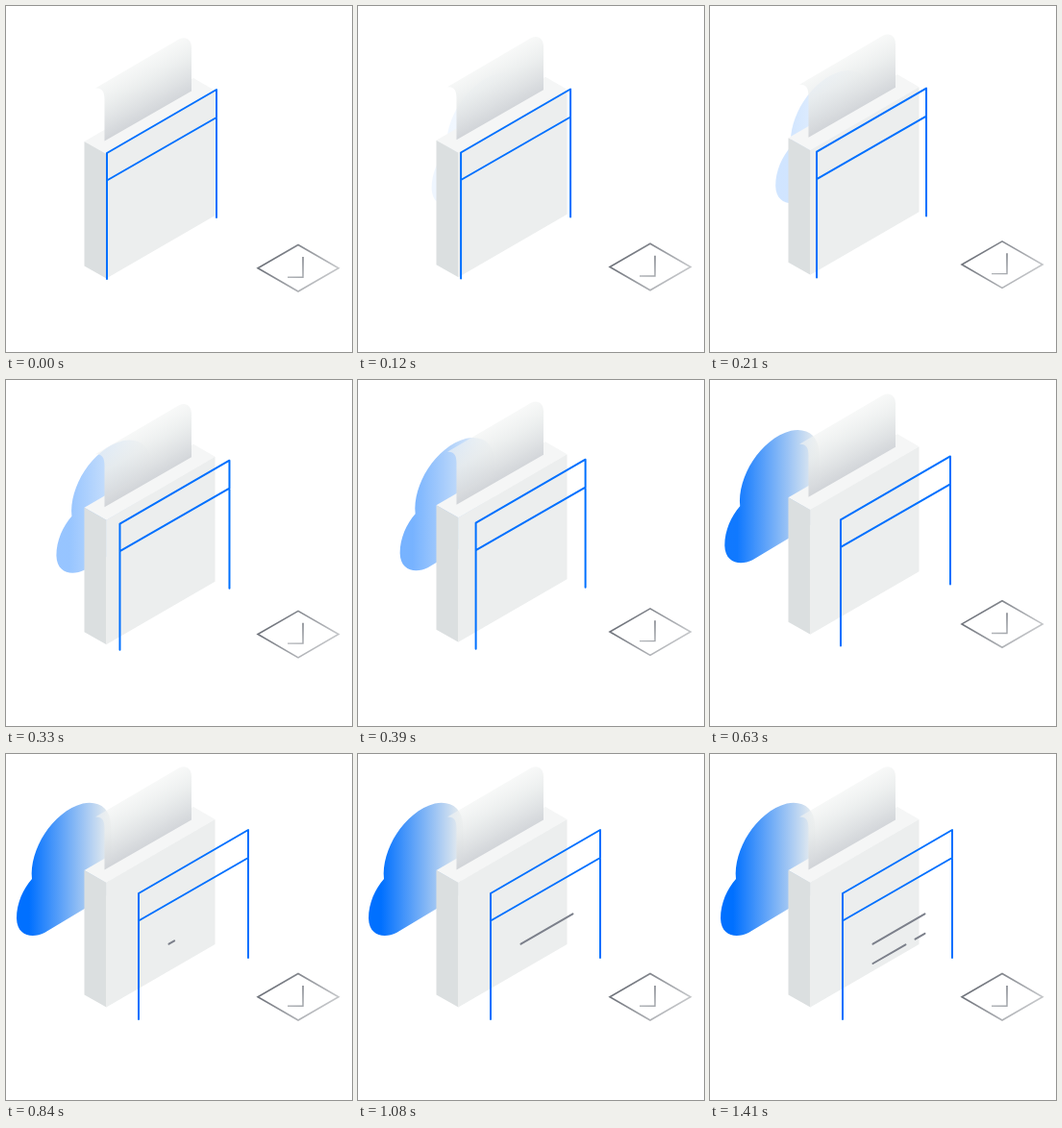
An HTML page for the animation above (1500 ms loop, 360x360 px).

```html
<!DOCTYPE html>
<html lang="en">
<head>
<meta charset="utf-8">
<title>Isometric form</title>
<style>
  html, body { margin: 0; height: 100%; overflow: hidden; background: #fff; }
  svg { display: block; width: 100%; height: 100%; }
</style>
</head>
<body>
<svg viewBox="0 0 360 360" fill="none">
  <defs>
    <linearGradient id="sky" gradientUnits="userSpaceOnUse" x1="24" y1="0" x2="108" y2="0">
      <stop stop-color="#0070ff"/>
      <stop offset="1" stop-color="#ebeeee"/>
    </linearGradient>
    <linearGradient id="sheet" gradientUnits="userSpaceOnUse" x1="134" y1="40" x2="160" y2="88">
      <stop stop-color="#f2f4f3" stop-opacity=".6"/>
      <stop offset=".4" stop-color="#e9ecec" stop-opacity=".88"/>
      <stop offset="1" stop-color="#d2d5d9"/>
    </linearGradient>
    <linearGradient id="rim" gradientUnits="userSpaceOnUse" x1="283" y1="234" x2="325" y2="272">
      <stop stop-color="#70747c"/>
      <stop offset="1" stop-color="#c2c4c7"/>
    </linearGradient>
    <linearGradient id="tick" gradientUnits="userSpaceOnUse" x1="309" y1="241" x2="300" y2="266">
      <stop stop-color="#70747c"/>
      <stop offset="1" stop-color="#b4b7bb"/>
    </linearGradient>
  </defs>

  <g id="scene">
    <path id="cloud" fill="url(#sky)" d="M27 130C24 100 48 60 80 51.5C97 48 108 57 109 72C110 92 110 120 105 147L40 186C28 192 11.500 190 11 171C11 155 18 140 27 130Z"/>

    <path fill="#f5f6f6" d="M81.500 121L104.500 134L217.500 68L195 55Z"/>
    <path fill="#dbdfe0" d="M81.500 121L104.500 134V263.500L81.500 250.500Z"/>
    <path fill="#eceeee" d="M104.300 133.800L217.500 68V198L104.300 263.500Z"/>
    <path fill="url(#sheet)" d="M93 65.500L180 14.500C187 11 193 15 193 23V68.500L102.500 120.500V77C102.500 69 100 65 93 65.500Z"/>

    <path stroke="url(#rim)" stroke-width="1.600" d="M304 228.500L346 252.700L304 277L262 252.700Z"/>
    <path stroke="url(#tick)" stroke-width="1.400" d="M309 241V262.300H293"/>

    <g id="lines" stroke="#7c808b" stroke-width="2" stroke-linecap="round"></g>
  </g>

  <path id="frame" stroke="#0070ff" stroke-width="2" stroke-linecap="round" stroke-linejoin="round"
        d="M138 276V145L252 79V212M138 173.500L252 108"/>
</svg>
<script>
  const LOOP = 1500, SLIDE = 750;
  const byId = id => document.getElementById(id);
  const [scene, cloud, frame, lines] = ['scene', 'cloud', 'frame', 'lines'].map(byId);
  const clamp = v => Math.min(1, Math.max(0, v));
  const move = (el, x, y) => el.setAttribute('transform', `translate(${x} ${y})`);

  // Each stroke grows from its first point to its second between start and end.
  const strokes = [
    { from: [169.5, 197.7], to: [223.5, 166.4], start: 813, end: 1080 },
    { from: [169.5, 218], to: [203.5, 198.4], start: 1230, end: 1365 },
    { from: [213.5, 192.6], to: [223.5, 186.8], start: 1365, end: 1410 },
  ].map(s => {
    const el = document.createElementNS('http://www.w3.org/2000/svg', 'path');
    return { ...s, el: lines.appendChild(el) };
  });

  function draw(t) {
    const rest = (1 + Math.cos(Math.PI * clamp(t / SLIDE))) / 2;
    move(scene, 0, 20 * rest);
    move(cloud, 70 * rest, 0);
    cloud.setAttribute('opacity', 1 - rest);
    move(frame, -33 * rest, 8 * rest);

    for (const { el, from: [x, y], to, start, end } of strokes) {
      const k = clamp((t - start) / (end - start));
      el.setAttribute('d', k ? `M${x} ${y}l${(to[0] - x) * k} ${(to[1] - y) * k}` : '');
    }
  }

  function tick() {
    draw(performance.now() % LOOP);
    requestAnimationFrame(tick);
  }
  tick();
</script>
</body>
</html>
```
